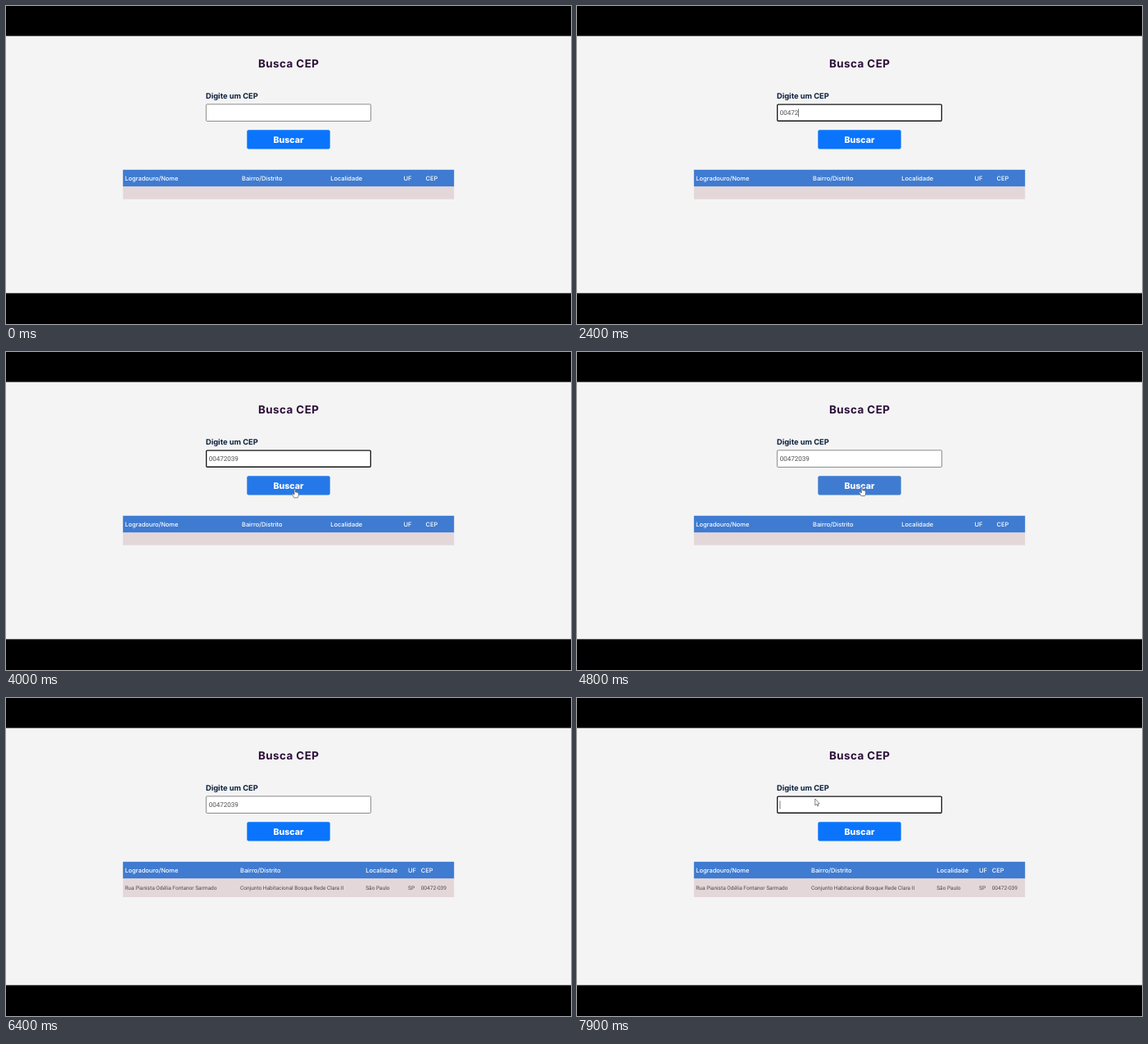
Recreate the animation shown at these times as an HTML page. Size 690 by 388 pixels, loop 8000 ms.

```html
<!DOCTYPE html>
<html lang="pt-BR">
<head>
<meta charset="utf-8">
<title>Busca CEP</title>
<style>
  html, body { margin: 0; width: 100%; height: 100%; overflow: hidden; background: #000; }
  svg { display: block; width: 690px; height: 388px; }
  text { font-family: Inter, "Open Sans", sans-serif; white-space: pre; text-rendering: geometricPrecision; }
  .title { font-size: 13.4px; font-weight: 700; letter-spacing: .45px; fill: #2b0f38; text-anchor: middle; }
  .label { font-size: 9.3px; font-weight: 700; fill: #0b1f3c; }
  .action { font-size: 10.6px; font-weight: 800; fill: #fff; text-anchor: middle; }
  .head text { font-size: 7.45px; font-weight: 500; fill: #fff; }
  .cells text { font: 6.55px Roboto, sans-serif; fill: #4f484a; }
  .value { font: 8.05px Roboto, sans-serif; fill: #505050; }
  .cursor { fill: #fff; stroke: #5c5c5c; stroke-width: .75; stroke-linejoin: round; }
</style>
</head>
<body>
<svg viewBox="0 0 690 388">
  <rect width="690" height="388"/>
  <rect y="36.6" width="690" height="313.8" fill="#f4f4f4"/>
  <text class="title" x="345.2" y="74.6">Busca CEP</text>
  <text class="label" x="244" y="113.4">Digite um CEP</text>

  <rect id="field" fill="#fff"/>
  <rect id="selection" y="125" height="11" fill="#0078d7"/>
  <text class="value" x="247.7" y="132.9"><tspan id="plain"></tspan><tspan id="marked" fill="#fff"></tspan></text>
  <rect id="caret" y="125.4" width=".7" height="10" fill="#444"/>

  <rect id="button" x="294.3" y="151.2" width="101.4" height="23.4" rx="2"/>
  <text class="action" x="345" y="166.9">Buscar</text>

  <rect x="142.8" y="199.8" width="404.4" height="20.6" fill="#3f7bd1"/>
  <rect id="row" x="142.8" y="220.4" width="404.4" fill="#e4d7d9"/>
  <g id="head" class="head"></g>
  <g id="cells" class="cells"></g>

  <path id="arrow" class="cursor" d="M0 0V8L1.8 6.4L3 9L4.2 8.4L3.1 6H5.4Z"/>
  <path id="hand" class="cursor" d="M0 .8Q.8-.4 1.5.8V4L2.9 4.1L4.2 4.5L5.2 5V8Q5 9.5 4.2 10.8H-.2Q-1.2 9-2.7 6.8Q-2.7 5.6-1.5 6L0 7.2Z"/>
</svg>
<script>
const LOOP = 8000, STEP = 100;
const CODE = "00472039";
const TYPED_AT = [1300, 1600, 1900, 2100, 2400, 2800, 3000, 3400];
const HEADS = ["Logradouro/Nome", "Bairro/Distrito", "Localidade", "UF", "CEP"];
const CELLS = ["Rua Pianista Odélia Fontanor Sarmado",
  "Conjunto Habitacional Bosque Rede Clara II", "São Paulo", "SP", "00472-039"];
const EMPTY_X = [145.3, 288, 396.3, 485.4, 512.6];
const FILLED_X = [145.3, 286, 439.2, 491, 506.7];

// time, pointer shape, x, y
const POINTER = [
  [0, ""],
  [4000, "hand", 352, 167], [4100, "hand", 347.3, 164.8],
  [4900, "hand", 372, 163], [5000, "arrow", 408, 160],
  [5100, "arrow", 440, 159.5], [5200, "arrow", 456.8, 159.6],
  [6000, "arrow", 454, 155], [6100, "arrow", 449, 146], [6200, ""],
  [7300, "arrow", 217, 113], [7600, "arrow", 226, 114],
  [7700, "arrow", 252, 118], [7800, "arrow", 276, 121], [7900, "arrow", 290.8, 123]
];
const FOCUS = [[400, 4800], [6700, LOOP]];
const CARET = [[500, 1000], [1300, 3900], [4400, 4800], [6700, 7000], [7500, LOOP]];

const $ = id => document.getElementById(id);
const within = (spans, t) => spans.some(([a, b]) => t >= a && t < b);
const clamp = v => Math.max(0, Math.min(1, v));
const show = (el, on) => el.setAttribute("visibility", on ? "visible" : "hidden");
const digitX = n => 247.6 + 4.52 * n;

function set(el, attrs) {
  for (const key in attrs) el.setAttribute(key, attrs[key]);
}

function addTexts(group, words, y) {
  return words.map((word, i) => {
    const el = document.createElementNS("http://www.w3.org/2000/svg", "text");
    set(el, { x: FILLED_X[i], y });
    el.textContent = word;
    group.append(el);
    return el;
  });
}

const heads = addTexts($("head"), HEADS, 212.6);
addTexts($("cells"), CELLS, 234.2);

function drawField(t) {
  const focused = within(FOCUS, t);
  const w = focused ? 1.3 : 0.8;
  set($("field"), {
    x: 244 + w / 2, y: 119.5 + w / 2, width: 202 - w, height: 21.4 - w,
    rx: 1.2, stroke: focused ? "#161616" : "#707070", "stroke-width": w
  });

  const count = t >= 7500 ? 0 : TYPED_AT.filter(at => t >= at).length;
  const marked = count && t >= 7000 ? Math.min(count, 2 * ((t - 7000) / STEP + 1)) : 0;
  const split = count - marked;
  $("plain").textContent = CODE.slice(0, split);
  $("marked").textContent = CODE.slice(split, count);
  set($("selection"), { x: digitX(split), width: digitX(count) - digitX(split) });
  set($("caret"), { x: digitX(count) });
  show($("caret"), within(CARET, t));
}

function drawButton(t) {
  const hover = clamp((t - 3900) / 200) - clamp((t - 4900) / 200);
  const mix = (a, b) => Math.round(a + (b - a) * hover);
  set($("button"), { fill: `rgb(${mix(10, 63)},${mix(116, 123)},${mix(252, 209)})` });
}

function drawTable(t) {
  const filled = t >= 5000;
  const xs = filled ? FILLED_X : EMPTY_X;
  heads.forEach((el, i) => set(el, { x: xs[i] }));
  set($("row"), { height: filled ? 22.6 : 15.3 });
  show($("cells"), filled);
}

function drawPointer(t) {
  const [, shape, x, y] = POINTER.filter(p => t >= p[0]).pop();
  for (const id of ["arrow", "hand"]) {
    show($(id), id === shape);
    if (id === shape) set($(id), { transform: `translate(${x} ${y})` });
  }
}

const start = performance.now();
function frame(now) {
  const t = Math.floor((Math.max(0, now - start) % LOOP) / STEP) * STEP;
  drawField(t);
  drawButton(t);
  drawTable(t);
  drawPointer(t);
  requestAnimationFrame(frame);
}
frame(start);
</script>
</body>
</html>
```
